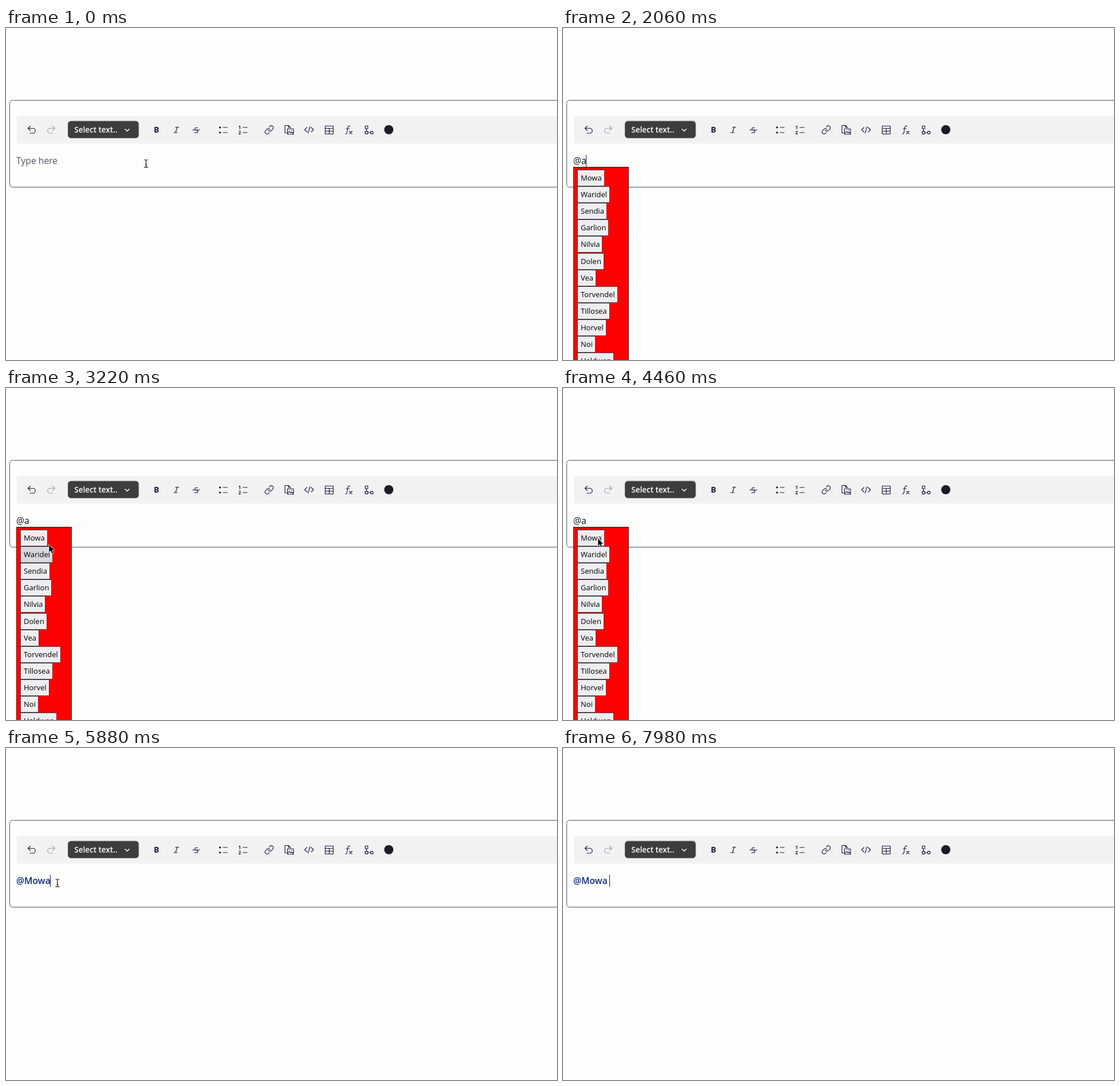
Write an HTML page that moves like this. It is 964 px wide and 581 px high and loops after 8 s.

```html
<!DOCTYPE html>
<html lang="en">
<head>
<meta charset="utf-8">
<title>Mention picker</title>
<style>
  html, body { margin: 0; width: 100%; height: 100%; overflow: hidden; background: #fdfdfc; }
  svg { display: block; width: 964px; height: 581px; font: 15.7px "Open Sans", "Noto Sans", sans-serif; }
  text { white-space: pre; }
  .icon { fill: none; stroke: #1b1a3c; stroke-width: 1.15; stroke-linecap: round; stroke-linejoin: round; }
  .glyph { fill: #1b1a3c; stroke: none; }
  #menu text { font-size: 13px; font-weight: 500; fill: #000; }
</style>
</head>
<body>
<svg viewBox="0 0 964 581">
  <rect x="6.5" y="126.5" width="980" height="152" rx="5" fill="#fdfdfc" stroke="#4b5572"/>
  <rect x="19" y="154" width="945" height="48" fill="#f2f2f3"/>

  <rect x="108.5" y="163" width="123.5" height="29.5" rx="5" fill="#3e3d3c" stroke="#6a6a70"/>
  <text x="119.5" y="183" font-size="13.5" font-weight="600" fill="#fff">Select text..</text>
  <path d="M208 176.500l4 4 4-4" fill="none" stroke="#fff" stroke-width="1.5"/>

  <g class="icon">
    <path d="M42.500 171.500l-4 4 4 4M38.500 175.500H47a4.200 4.200 0 0 1 0 8.500H42"/>
    <path stroke="#a0a0aa" d="M81.500 171.500l4 4-4 4M85.500 175.500H77a4.200 4.200 0 0 0 0 8.500H82"/>
    <text class="glyph" x="258.5" y="183" font-size="14" font-weight="700">B</text>
    <path d="M296.500 173.500h6M293.500 183h6M299.800 173.500l-3.300 9.500"/>
    <text class="glyph" x="329" y="183.5" font-size="14.5">S</text>
    <path d="M326.500 178.500h13"/>
    <path d="M380 174h7M380 183h7M414.500 174h7.500M414.500 183h7.500"/>
    <circle class="glyph" cx="374.5" cy="174" r="1.7"/>
    <circle class="glyph" cx="374.5" cy="183" r="1.7"/>
    <text class="glyph" x="406.5" y="177" font-size="8" font-weight="700">1</text>
    <text class="glyph" x="406.5" y="186" font-size="8" font-weight="700">2</text>
    <path transform="translate(451.8 169.6) scale(.72)" stroke-width="1.6"
      d="M10 13a5 5 0 0 0 7.540.540l3-3a5 5 0 0 0-7.070-7.070l-1.720 1.710M14 11a5 5 0 0 0-7.540-.540l-3 3a5 5 0 0 0 7.070 7.070l1.710-1.710"/>
    <path d="M491 183.500h-3v-13h6l4 4M494 170.500v3.500h4M492.500 176.500h10.500v9.500h-10.500zM493 184.500l3-3.500 2.500 2.500 1.500-1.500 2.500 2.500M499.500 179h1"/>
    <path d="M526.500 174l-4 4 4 4M534 174l4 4-4 4M532 172.500l-3.500 11.500"/>
    <path d="M558.500 171.500h14v14h-14zM558.500 175.500h14M558.500 180.500h14M565.500 175.500v10"/>
    <path d="M602 171.800c-2.500-1-3.700 0-4.100 2.700l-1.500 8.500c-.4 2-1.400 2.600-2.500 2M595 176h5.500M601 180.500l4.500 5M605.500 180.500l-4.500 5"/>
    <path d="M628.500 171.500h4.500v4.500h-4.500zM628.500 180.800h4.500v4.500h-4.500zM630.700 176v4.800M633 183h4.500"/>
    <circle cx="640" cy="183" r="2.4"/>
  </g>
  <circle cx="669.7" cy="178" r="8" fill="#1c1b26"/>

  <text id="entry" x="18" y="238"></text>
  <rect id="caret" y="222" width="1" height="21" fill="#15153a"/>
  <g id="menu"><rect x="18.5" y="243.5" width="96" height="400" fill="#fe0000" stroke="#301010"/></g>
  <g id="pointer">
    <path id="arrow" d="M0 0V14L3.200 11 5.400 16 8 15 5.800 10H10Z" fill="#000" stroke="#fff" stroke-width=".8"/>
    <path id="beam" d="M-3.500-6.500Q-.5-6.500 0-5Q.5-6.500 3.500-6.500M0-5V5.500M-3.500 7Q-.5 7 0 5.500Q.5 7 3.500 7M-1.500 2.500h3" fill="none" stroke="#111" stroke-width="1.2"/>
  </g>
</svg>
<script>
const LOOP = 8000;
const MENU_OPEN = 2060, PRESS = 4410, PICK = 4600, SPACE_TYPED = 7060;
const ROW = 29.1, ROW_TOP = 249;
const names = ["Mowa", "Waridel", "Sendia", "Garlion", "Nilvia", "Dolen",
  "Vea", "Torvendel", "Tillosea", "Horvel", "Noi", "Haldwen"];

// [start time, text, colour, weight]
const entries = [
  [0, "Type here", "#565666", 400],
  [200, "@", "#100f28", 500],
  [MENU_OPEN, "@a", "#100f28", 500],
  [PICK, "@" + names[0], "#0b2b86", 600]
];
const caretOn = [[200, 1080], [1820, 3060], [5380, 6060], [SPACE_TYPED, LOOP]];
const pointerOn = [[0, 200], [2260, 7980]];

// [time, x, y]
const route = [
  [0, 245, 237], [2260, 245, 237], [2600, 164, 275], [2660, 164, 275], [3220, 75, 274],
  [3320, 75, 274], [3800, 62, 302], [4380, 61, 263], [4800, 61, 263], [5800, 90, 236],
  [6000, 90, 236], [6260, 194, 172], [6540, 158, 260], [6860, 158, 260], [7200, 161, 260]
];

const $ = id => document.getElementById(id);
const [entry, caret, menu, pointer, arrow, beam] =
  ["entry", "caret", "menu", "pointer", "arrow", "beam"].map($);
const show = (node, on) => node.style.display = on ? "" : "none";
const within = (spans, t) => spans.some(([from, to]) => t >= from && t < to);

function add(tag, attrs, text = "") {
  const node = document.createElementNS("http://www.w3.org/2000/svg", tag);
  for (const key in attrs) node.setAttribute(key, attrs[key]);
  node.textContent = text;
  return menu.appendChild(node);
}

const buttons = names.map((name, i) => {
  const y = Math.round(ROW_TOP + i * ROW);
  const face = add("rect", { x: 25.5, y: y - 0.5, height: 28, stroke: "#4c424c" });
  const label = add("text", { x: 31, y: y + 18 }, name);
  const width = Math.round(label.getComputedTextLength() + 10);
  face.setAttribute("width", width);
  return { face, width };
});

function pointerAt(t) {
  const next = route.findIndex(p => p[0] > t);
  if (next < 0) return route.at(-1).slice(1);
  const [t0, x0, y0] = route[next - 1], [t1, x1, y1] = route[next];
  const u = (t - t0) / (t1 - t0), ease = u * u * (3 - 2 * u);
  return [x0 + (x1 - x0) * ease, y0 + (y1 - y0) * ease];
}

function draw(t) {
  const [, text, color, weight] = entries.findLast(e => t >= e[0]);
  entry.textContent = text;
  entry.setAttribute("fill", color);
  entry.setAttribute("font-weight", weight);

  show(caret, within(caretOn, t));
  const space = t >= SPACE_TYPED ? 4 : 0;
  caret.setAttribute("x", Math.round(17.5 + entry.getComputedTextLength() + space));

  const [x, y] = pointerAt(t);
  const inText = y > 205 && y < 248 && (t < MENU_OPEN || t > PICK || x > 115);
  show(pointer, within(pointerOn, t));
  pointer.setAttribute("transform", `translate(${x} ${y})`);
  show(arrow, !inText);
  show(beam, inText);

  show(menu, t >= MENU_OPEN && t < PICK);
  // The hot spot sits a little below the drawn tip.
  const hovered = t < PRESS ? Math.floor((y + 5 - ROW_TOP) / ROW) : -1;
  buttons.forEach(({ face, width }, i) => {
    const on = i === hovered && x < 26 + width;
    face.setAttribute("fill", on ? "#d9d9dc" : "#eeeef1");
  });
}

function tick() {
  draw(performance.now() % LOOP);
  requestAnimationFrame(tick);
}
tick();
</script>
</body>
</html>
```
